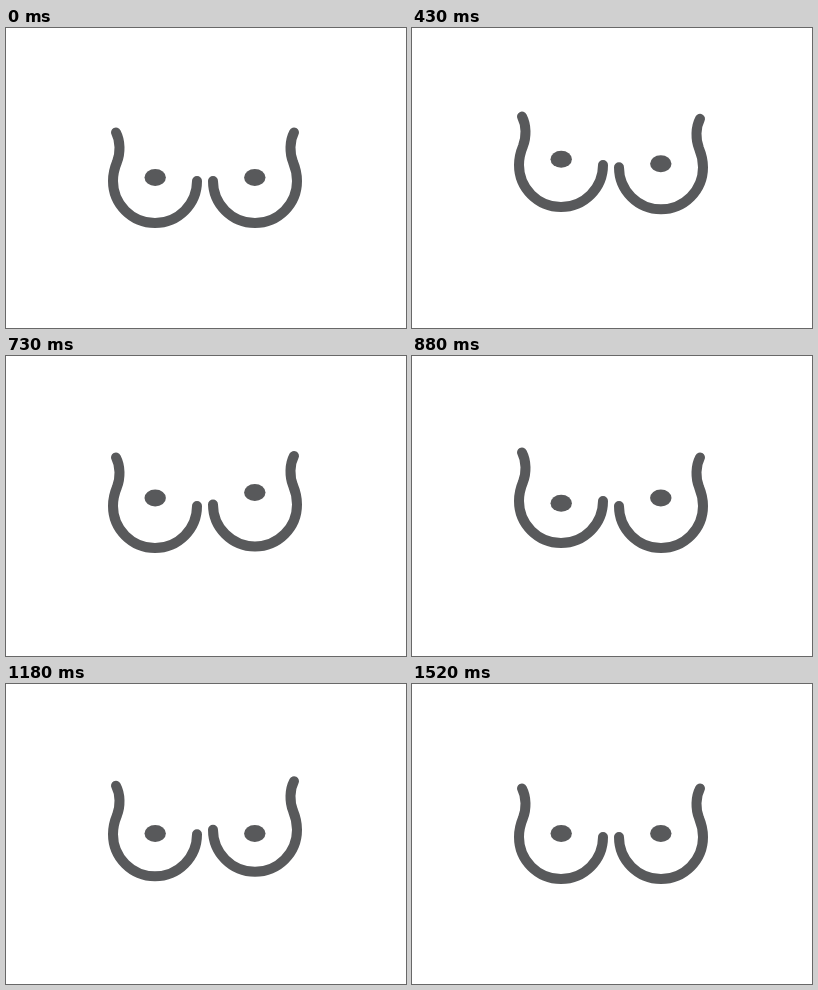
Animation, 400 px wide and 300 px high, one loop 2.48 s. Source, as an HTML page:

```html
<!DOCTYPE html>
<html lang="en">
<head>
<meta charset="utf-8">
<title>Bounce</title>
<style>
  html, body { margin: 0; width: 100%; height: 100%; overflow: hidden; background: #fff; }
  svg { display: block; width: 100%; height: 100%; }
  path { fill: none; stroke: #58595b; stroke-width: 10; stroke-linecap: round; }
  ellipse { fill: #58595b; }
</style>
</head>
<body>
<svg viewBox="0 0 400 300">
  <defs>
    <path id="curve" d="M110 104.5C114.5 113 114.5 125 111 134C108.5 140 107 146 107 153A42 42 0 0 0 191 153"/>
    <ellipse id="dot" cx="149.2" cy="149.5" rx="10.7" ry="8.5"/>
  </defs>
  <g class="side"><use href="#curve"/><use href="#dot"/></g>
  <g class="side" transform="matrix(-1 0 0 1 398 0)"><use href="#curve"/><use href="#dot"/></g>
</svg>
<script>
  const LOOP = 2480, STEP = 30, LAG = 150;
  // [time in ms, vertical offset]
  const CURVE = [[100, 0], [370, -20.5], [640, 0], [940, -10], [1270, 0]];
  const DOT = [[100, 0], [370, -20.5], [940, 0]];
  const sides = [...document.querySelectorAll('.side')];

  function offset(keys, t) {
    const i = keys.findIndex(([time]) => time > t);
    if (i < 1) return 0;
    const [t0, y0] = keys[i - 1], [t1, y1] = keys[i];
    return y0 + (y1 - y0) * (t - t0) / (t1 - t0);
  }

  function draw(now) {
    const t = 10 + Math.floor((now % LOOP - 10) / STEP) * STEP;
    sides.forEach(({ children: [curve, dot] }, i) => {
      curve.setAttribute('y', offset(CURVE, t - i * LAG));
      dot.setAttribute('y', offset(DOT, t - i * LAG));
    });
  }

  let start;
  function tick(now) {
    start ??= now;
    draw(now - start);
    requestAnimationFrame(tick);
  }
  requestAnimationFrame(tick);
</script>
</body>
</html>
```
